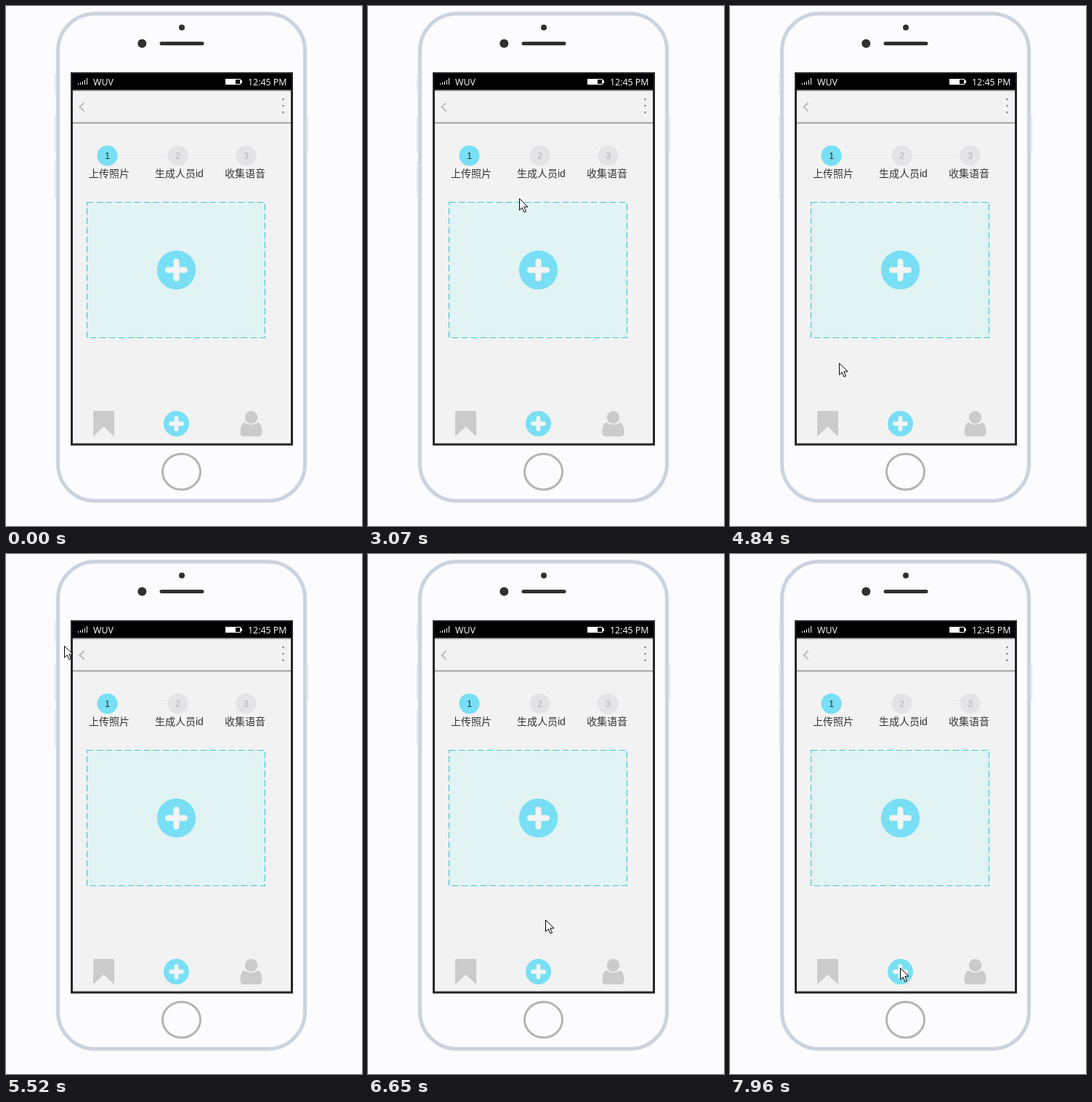
These frames come from a looping animation (490 px wide and 714 px high, 8000 ms). An HTML page:

```html
<!DOCTYPE html>
<html lang="zh">
<head>
<meta charset="utf-8">
<title>上传照片</title>
<style>
  html, body { margin: 0; width: 100%; height: 100%; overflow: hidden; background: #fcfcff; }
  svg { display: block; width: 490px; height: 714px; }
  text { font: 14px "Liberation Sans", "Noto Sans CJK SC", "Noto Sans CJK", sans-serif; fill: #333; }
  .bar text { font: 500 12.4px "Open Sans", "Noto Sans", sans-serif; fill: #fff; }
  .num { font-size: 13px; text-anchor: middle; }
  .off { fill: #b4b4b6; }
  .blue { fill: #78dff4; }
  .dark { fill: #303033; }
  .icon { fill: #cbcbcb; }
  .key { fill: #dde1e6; }
  .plus { stroke: #f2f4f5; stroke-linecap: round; }
  #cursor { animation: move 8s step-end infinite; }

  /* Each stretch of motion advances in ticks of about 40 ms. */
  @keyframes move {
    0% { transform: translate(-40px, -40px); }
    38.375% { transform: translate(208px, 264px); }
    39% { transform: translate(309px, 345px); }
    41% { transform: translate(309px, 345px); animation-timing-function: steps(7); }
    45% { transform: translate(390px, 440px); animation-timing-function: steps(6); }
    49% { transform: translate(462px, 460px); }
    51.5% { transform: translate(462px, 460px); animation-timing-function: steps(3); }
    53.5% { transform: translate(478px, 420px); animation-timing-function: steps(4); }
    55.75% { transform: translate(452px, 390px); }
    58.5% { transform: translate(452px, 390px); animation-timing-function: steps(2); }
    59.5% { transform: translate(370px, 490px); animation-timing-function: steps(2); }
    60.5% { transform: translate(150px, 490px); animation-timing-function: steps(2); }
    61.625% { transform: translate(90px, 470px); }
    64.25% { transform: translate(90px, 470px); animation-timing-function: steps(4); }
    66.25% { transform: translate(12px, 330px); animation-timing-function: steps(4); }
    68.25% { transform: translate(50px, 150px); animation-timing-function: steps(4); }
    70.25% { transform: translate(170px, 53px); animation-timing-function: steps(4); }
    72.25% { transform: translate(330px, 80px); animation-timing-function: steps(3); }
    73.75% { transform: translate(376px, 180px); animation-timing-function: steps(3); }
    75.25% { transform: translate(313px, 255px); animation-timing-function: steps(5); }
    77.75% { transform: translate(210px, 245px); animation-timing-function: steps(4); }
    79.75% { transform: translate(140px, 380px); animation-timing-function: steps(4); }
    81.5% { transform: translate(170px, 500px); animation-timing-function: steps(3); }
    83.125% { transform: translate(244px, 502px); animation-timing-function: steps(4); }
    85.25% { transform: translate(244px, 554px); animation-timing-function: steps(4); }
    87.5% { transform: translate(170px, 566px); animation-timing-function: steps(4); }
    89.5% { transform: translate(234px, 570px); }
    91.125% { transform: translate(234px, 570px); animation-timing-function: steps(2); }
    92.125% { transform: translate(312px, 572px); animation-timing-function: steps(3); }
    93.625% { transform: translate(128px, 571px); }
    97.875% { transform: translate(128px, 571px); animation-timing-function: steps(3); }
    99.5%, 100% { transform: translate(234px, 568px); }
  }
</style>
</head>
<body>
<svg viewBox="0 0 490 714">
  <!-- phone body -->
  <g class="key">
    <rect x="67" y="93" width="4" height="28" rx="1"/>
    <rect x="67" y="151" width="4" height="51" rx="1"/>
    <rect x="67" y="213" width="4" height="51" rx="1"/>
    <rect x="412" y="151" width="4" height="51" rx="1"/>
  </g>
  <g fill="none">
    <rect x="71.5" y="10.5" width="340" height="669" rx="51" stroke="#f0f3f6" stroke-width="7"/>
    <rect x="71.5" y="10.5" width="340" height="669" rx="51" stroke="#cbd2db" stroke-width="4.5"/>
    <ellipse cx="241.5" cy="639.5" rx="26" ry="24.5" stroke="#b4b4b4" stroke-width="3"/>
  </g>
  <g class="dark">
    <circle cx="242" cy="29.5" r="4"/>
    <circle cx="187.3" cy="51.4" r="6"/>
    <rect x="211.5" y="49" width="61" height="5" rx="2.5"/>
  </g>

  <!-- screen -->
  <rect x="90.5" y="92.5" width="303" height="509.5" fill="#f2f2f2" stroke="#26262a" stroke-width="3"/>
  <g class="bar">
    <rect x="91" y="93" width="302" height="22.5"/>
    <path d="M99.5 106v2M102.5 105v3M105.5 103.5v4.5M108.5 101.5v6.5M111.5 99v9" stroke="#fff"/>
    <text x="120" y="109">WUV</text>
    <rect x="302.5" y="100.5" width="20" height="7" fill="none" stroke="#fff"/>
    <path d="M303 101h13v6h-13zM323 102h2v4h-2z" fill="#fff"/>
    <text x="386.5" y="109" text-anchor="end">12:45 PM</text>
  </g>
  <path d="M92 116h300M92 160.5h300" stroke="#888" stroke-width="1.4"/>
  <path d="M107.5 133l-6 5.7 6 5.7" fill="none" stroke="#bbb" stroke-width="2"/>
  <g fill="#777">
    <circle cx="381.5" cy="128" r="1.2"/>
    <circle cx="381.5" cy="137" r="1.2"/>
    <circle cx="381.5" cy="146" r="1.2"/>
  </g>

  <!-- steps -->
  <path d="M153 205.5h164" stroke="#e9e9ea"/>
  <circle class="blue" cx="139.5" cy="205.5" r="14"/>
  <g fill="#e4e4e6">
    <circle cx="236.5" cy="205.5" r="14"/>
    <circle cx="330.5" cy="205.5" r="14"/>
  </g>
  <text class="num" x="139.5" y="210">1</text>
  <text class="num off" x="236.5" y="210">2</text>
  <text class="num off" x="330.5" y="210">3</text>
  <text x="114" y="235">上传照片</text>
  <text x="205" y="235">生成人员id</text>
  <text x="301" y="235">收集语音</text>

  <!-- upload area -->
  <rect x="111.5" y="269.5" width="245" height="186" fill="#e1f3f3" stroke="#42c8e0" stroke-width="1.2" stroke-dasharray="9 4"/>
  <circle class="blue" cx="234.5" cy="362.5" r="26.7"/>
  <path class="plus" d="M223 362.5h23M234.5 351v23" stroke-width="8"/>

  <!-- tabs -->
  <path class="icon" d="M122 556h25q2 0 2 2v33l-14.500-13.500L120 591v-33q0-2 2-2z"/>
  <circle class="blue" cx="234.5" cy="573.5" r="17.5"/>
  <path class="plus" d="M227 573.5h15M234.5 566v15" stroke-width="5.8"/>
  <g class="icon">
    <path d="M328 572q9.500 6 19 0c4 1 5.500 7 5.500 13 0 4-2 6-5.500 6h-19c-3.500 0-5.500-2-5.500-6 0-6 1.500-12 5.500-13z"/>
    <circle cx="337.5" cy="564.7" r="8.8"/>
  </g>

  <g id="cursor">
    <path d="M.5 .5v16l3.700-3.600 2.700 6.200 2.600-1.100-2.700-6.100h5.200z" fill="#fff" stroke="#000"/>
  </g>
</svg>
</body>
</html>
```
